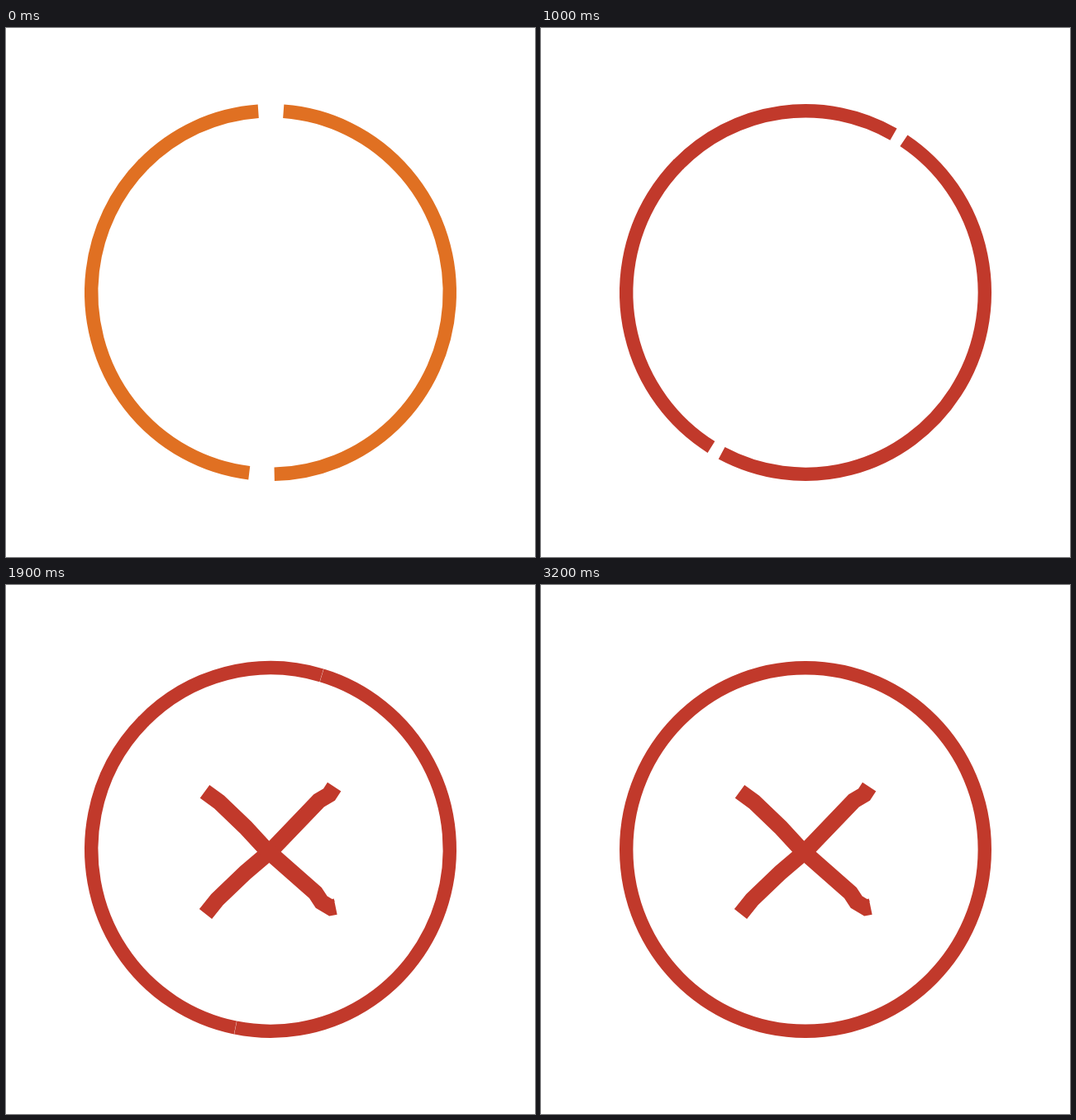
These frames come from a looping animation (640 by 640 pixels, 3300 ms). An HTML page with a canvas:

```html
<!DOCTYPE html>
<html lang="en">
<head>
<meta charset="utf-8">
<title>Ring and cross</title>
<style>
html, body { margin: 0; width: 100%; height: 100%; overflow: hidden; background: #fff; }
canvas { display: block; width: 640px; height: 640px; }
</style>
</head>
<body>
<canvas id="stage" width="640" height="640"></canvas>
<script>
const ctx = document.getElementById('stage').getContext('2d');
const LOOP = 3300, STEP = 100;
const DASH = 174.6, GAP = 8.06;      // degrees
const CLOSED = 1920;                 // ms until the gaps are gone
const SEAM = 225;                    // angle where the ring path begins
const DRAW_FROM = 1188, DRAW_TO = 1890;

const clamp = x => Math.min(1, Math.max(0, x));
const part = (t, a, b) => clamp((t - a) / (b - a));
const mix = (a, b, k) => a + (b - a) * k;

// A hook that runs into a diagonal; the other bar is its squeezed quarter turn.
const hook = [[320.5, 189.5], [348, 194], [375.5, 206.5], [394, 222], [398.5, 242], [391, 253.5],
              [378.5, 261], [319.5, 322.5], [290, 347.5], [255.5, 380.5], [241.5, 398]];
const turned = hook.map(([x, y]) => [240.5 + 0.977 * (398 - y), 320.5 + 0.895 * (x - 320.5)]);

function makeBar(pts, hidden) {
  let len = 0;
  for (let i = 1; i < pts.length; i++) {
    len += Math.hypot(pts[i][0] - pts[i - 1][0], pts[i][1] - pts[i - 1][1]);
  }
  return { pts, hidden, len };
}
const bars = [makeBar(hook, 105.2), makeBar(turned, 89)];

// The spin slows down very slightly.
const turnAt = t => -133.5 + t * (0.5757 - 7e-6 * t);

function colorAt(t) {
  const k = part(t, 0, 200);
  return `rgb(${mix(224, 193, k)}, ${mix(112, 57, k)}, ${mix(34, 43, k)})`;
}

function arc(from, to) {
  const rad = Math.PI / 180;
  ctx.beginPath();
  ctx.ellipse(320, 320, 216.8, 219.8, 0, (from + SEAM) * rad, (to + SEAM) * rad);
  ctx.stroke();
}

function drawRing(t) {
  ctx.lineWidth = 16.4;
  if (t >= CLOSED) return arc(0, 360);
  const period = DASH + GAP * (1 - t / CLOSED);
  let at = turnAt(t) % period;
  if (at > 0) at -= period;
  for (; at < 360; at += period) {
    const end = Math.min(360, at + DASH);
    // a slight overlap hides the joint at the path start
    if (end > 0) arc(Math.max(-0.2, at), end);
  }
}

function drawBar({ pts, hidden, len }, t) {
  const head = len * part(t, DRAW_FROM, DRAW_TO);
  if (head === 0) return;
  const tail = Math.max(0, head - (len - hidden));
  ctx.lineWidth = 19.5;
  ctx.setLineDash([head - tail, 2000]);
  ctx.lineDashOffset = -tail;
  ctx.beginPath();
  pts.forEach(([x, y]) => ctx.lineTo(x, y));
  ctx.stroke();
  ctx.setLineDash([]);
}

function draw(t) {
  ctx.fillStyle = '#fff';
  ctx.fillRect(0, 0, 640, 640);
  ctx.strokeStyle = colorAt(t);
  drawRing(t);
  bars.forEach(bar => drawBar(bar, t));
}

const start = performance.now();
function tick() {
  const t = (performance.now() - start) % LOOP;
  draw(Math.floor(t / STEP) * STEP);
  requestAnimationFrame(tick);
}
tick();
</script>
</body>
</html>
```
